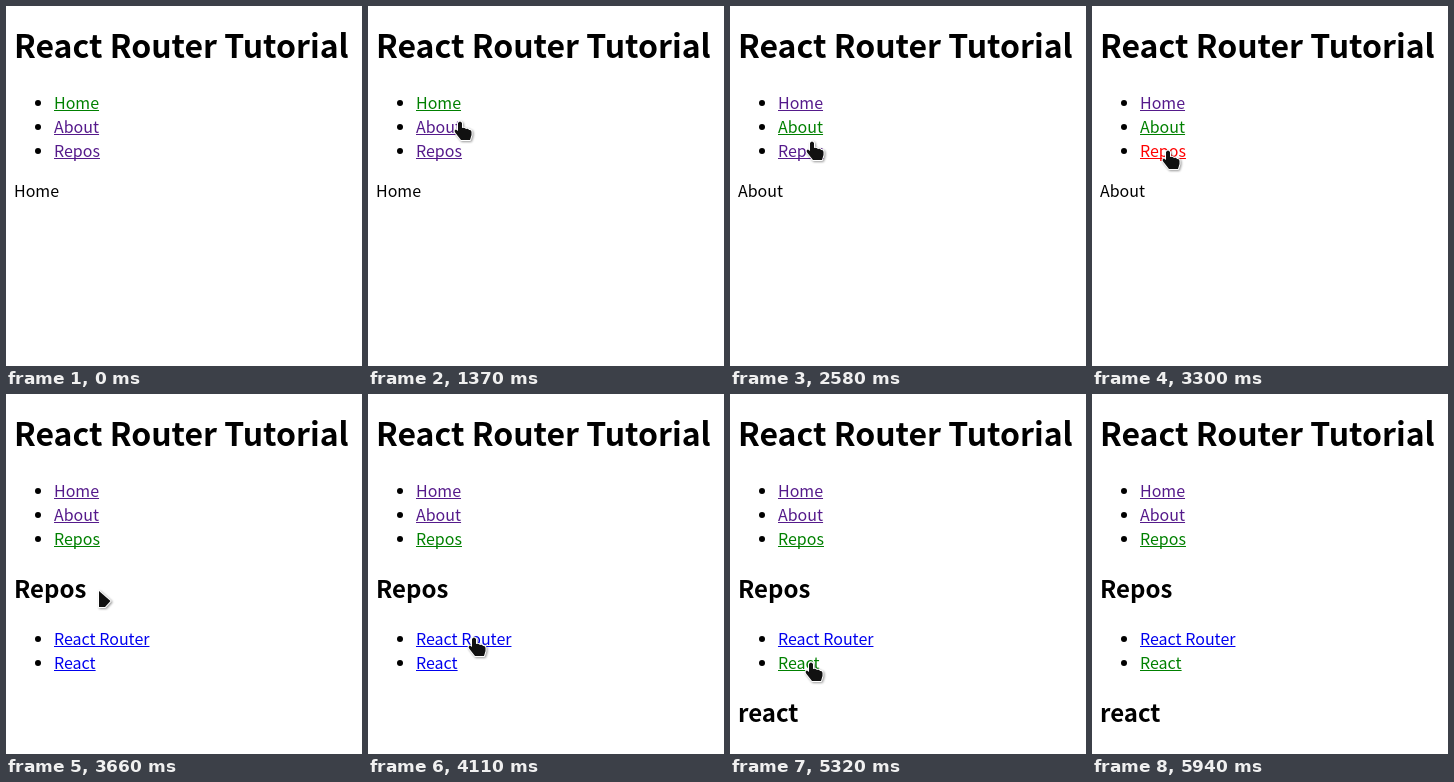
Animation, 356 px wide and 360 px high, one loop 7.04 s. Source, as an HTML page:

```html
<!DOCTYPE html>
<html lang="en">
<head>
<meta charset="utf-8">
<title>Router tutorial</title>
<style>
  html, body { margin: 0; width: 100%; height: 100%; overflow: hidden; background: #fff; }
  main {
    display: flow-root; padding: 0 8px; color: #000; white-space: nowrap;
    font: 16px/1.5 "Noto Sans CJK JP", "Noto Sans CJK SC", "Noto Sans CJK", "Noto Sans", sans-serif;
  }
  h1 { font-size: 32px; margin: 14.44px 0 21.44px; }
  h2 { font-size: 24px; margin: 19.92px 0; }
  ul { margin: 16px 0; padding-left: 40px; }
  #repos ul { margin: 0; }
  a {
    color: #00e; cursor: inherit;
    text-decoration: underline 1px; text-decoration-skip-ink: none;
  }
  a.visited { color: #551a8b; }
  a.active { color: #008000; }
  a.pressed { color: #f00; }
  [hidden] { display: none; }
  svg {
    position: absolute; left: 0; top: 0; overflow: visible; pointer-events: none;
    filter: drop-shadow(1px 1px 1px #0006);
  }
  path { fill: #111; stroke: #fff; stroke-width: 2; stroke-linejoin: round; paint-order: stroke; }
</style>
</head>
<body>
<main>
  <h1>React Router Tutorial</h1>
  <ul>
    <li><a class="visited" data-page="home">Home</a></li>
    <li><a class="visited" data-page="about">About</a></li>
    <li><a class="visited" data-page="repos">Repos</a></li>
  </ul>
  <div id="text"></div>
  <div id="repos">
    <h2>Repos</h2>
    <ul>
      <li><a data-page="react-router">React Router</a></li>
      <li><a data-page="react">React</a></li>
    </ul>
    <h2 id="repo"></h2>
  </div>
</main>
<svg id="cursor" width="1" height="1"><path id="shape"/></svg>
<script>
const LOOP = 7040;
const HAND = "M-2 2Q0-1 2 2V7Q4 6 6 8Q8 7 9 9Q11.5 8.5 11.5 11V14L10 19H1L-4.5 12Q-6.5 9-4 8.5L-2 10Z";
const ARROW = "M1 1L12.5 11L7 17H1Z";

const clicks = [
  { page: "about", press: 2220, release: 2300 },
  { page: "repos", press: 3210, release: 3340 },
  { page: "react-router", press: 4270, release: 4390 },
  { page: "react", press: 5080, release: 5160 },
];

// Pointer waypoints: time, x, y
const route = [
  [1370, 92, 115], [1490, 78, 115], [2260, 78, 115], [2580, 82, 135],
  [2740, 81, 155], [2950, 81, 155], [3070, 76, 144], [3320, 76, 144],
  [3900, 104, 233], [4110, 106, 243], [4350, 106, 243], [4680, 92, 262],
  [4860, 81, 268], [5620, 81, 268], [5900, 4, 302], [5940, 4, 302],
];

const $ = id => document.getElementById(id);
const links = [...document.querySelectorAll("a")];

function pointerAt(t) {
  const next = route.findIndex(([time]) => time > t);
  if (next < 1) return null;
  const [t0, x0, y0] = route[next - 1];
  const [t1, x1, y1] = route[next];
  const k = (t - t0) / (t1 - t0);
  return [Math.round(x0 + (x1 - x0) * k), Math.round(y0 + (y1 - y0) * k)];
}

function drawPage(t) {
  const done = clicks.filter(c => t >= c.release).map(c => c.page);
  const page = done.at(-1) ?? "home";
  const pressed = clicks.find(c => t >= c.press && t < c.release)?.page;
  const inRepos = done.includes("repos");

  for (const link of links) {
    const name = link.dataset.page;
    link.classList.toggle("active", name === page || (name === "repos" && inRepos));
    link.classList.toggle("pressed", name === pressed);
  }
  $("text").hidden = inRepos;
  $("text").textContent = page === "about" ? "About" : "Home";
  $("repos").hidden = !inRepos;
  $("repo").textContent = page.startsWith("react") ? page : "";
}

function drawPointer(t) {
  const point = pointerAt(t);
  $("cursor").style.display = point ? "block" : "none";
  if (!point) return;
  const [x, y] = point;
  const overLink = document.elementFromPoint(x - 1, y)?.closest("a");
  $("shape").setAttribute("d", overLink ? HAND : ARROW);
  $("cursor").style.transform = `translate(${x}px, ${y}px)`;
}

const start = performance.now();
function frame() {
  const t = (performance.now() - start) % LOOP;
  drawPage(t);
  drawPointer(t);
  requestAnimationFrame(frame);
}
frame();
</script>
</body>
</html>
```
